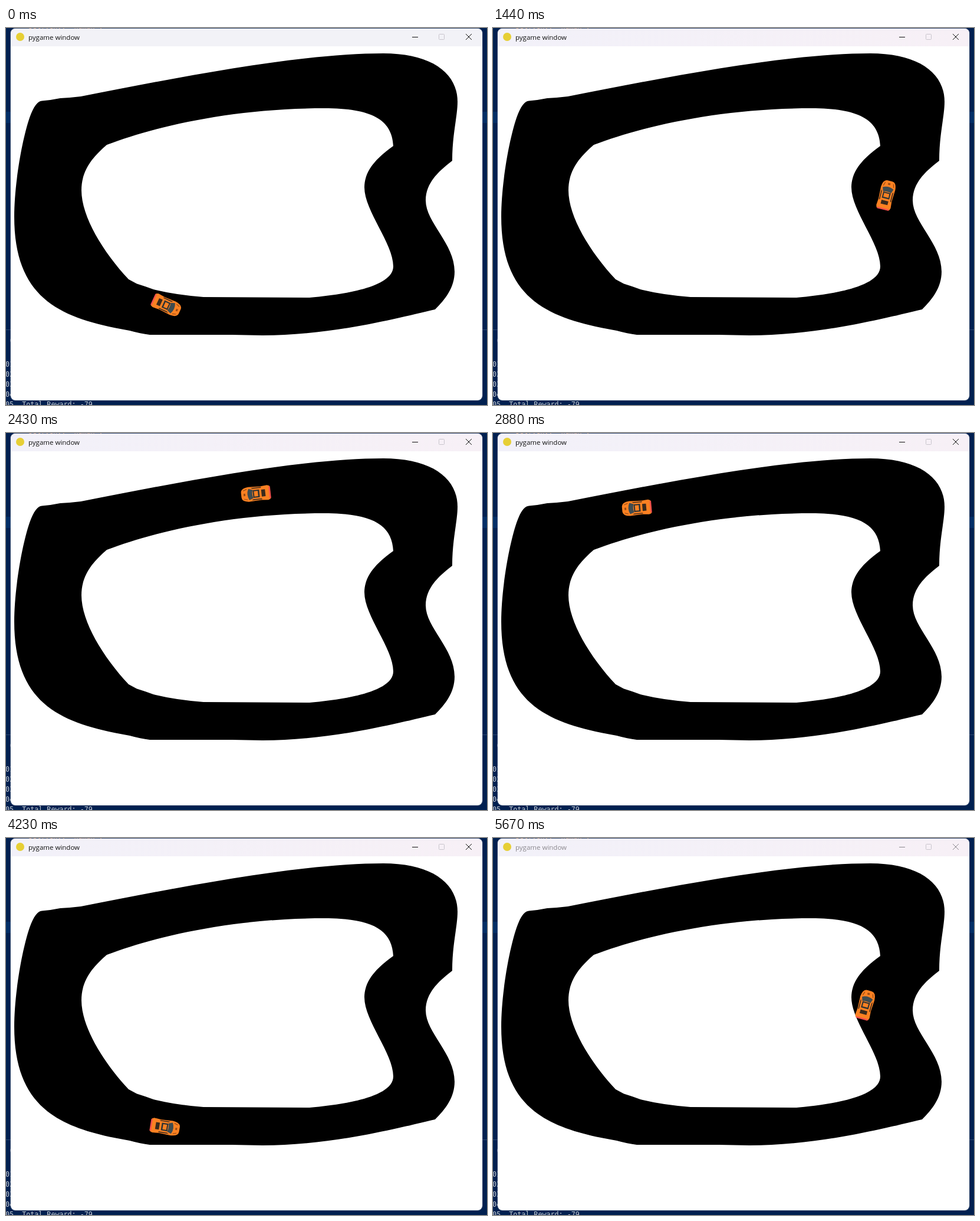
Write an HTML page that moves like this. It is 816x639 px and loops after 5750 ms.

```html
<!DOCTYPE html>
<html lang="en">
<head>
<meta charset="utf-8">
<title>pygame window</title>
<style>
  html, body { margin: 0; width: 100%; height: 100%; overflow: hidden; background: #012050; }
  svg { display: block; width: 816px; height: 639px; }
  .term { font: 11.7px "DejaVu Sans Mono", monospace; fill: #c8ccd4; white-space: pre; }
  .title { font: 11.5px "Open Sans", "Noto Sans", sans-serif; }
</style>
</head>
<body>
<svg viewBox="0 0 816 639">
  <defs>
    <linearGradient id="bar">
      <stop offset="0" stop-color="#f2f1f9"/>
      <stop offset="1" stop-color="#f7f0f6"/>
    </linearGradient>
    <clipPath id="frame"><rect x="8" y="1" width="800" height="630" rx="8"/></clipPath>
  </defs>

  <!-- terminal behind the window -->
  <rect width="816" height="639" fill="#012050"/>
  <rect y="142" width="816" height="19" fill="#022e66"/>
  <rect y="511" width="816" height="1" fill="#2c466f"/>
  <g class="term">
    <text x="38" y="1" fill="#d08a5a">self.env, "human":</text>
    <text x="5" y="534">(</text>
    <text x="-1" y="574">01</text>
    <text x="-1" y="591">02</text>
    <text x="-1" y="608">03</text>
    <text x="-1" y="625">04</text>
    <text x="-1" y="642">05, Total Reward: -79</text>
  </g>

  <!-- window -->
  <rect x="7.5" y="0.5" width="801" height="631" rx="8.5" fill="none" stroke="#8890a0" stroke-opacity=".4"/>
  <g clip-path="url(#frame)">
    <rect x="8" y="1" width="800" height="630" fill="#fff"/>
    <rect id="titlebar" x="8" y="1" width="800" height="30" fill="url(#bar)"/>
    <circle cx="24" cy="15" r="7" fill="#e6cf35"/>
    <g id="controls" fill="none" stroke="#111">
      <text class="title" id="caption" x="38" y="20" fill="#111" stroke="none">pygame window</text>
      <path d="M689 15.5H699M780 10L790 20M790 10L780 20"/>
    </g>
    <rect x="734.5" y="10.5" width="9" height="9" rx="1" fill="none" stroke="#c8c4cc"/>

    <path fill-rule="evenodd" d="
      M127 116C300 82 500 43 640 43C720 43 766 75 766 125C766 150 757 180 757 225
      C735 242 712 262 712 292C712 330 761 365 761 413C761 440 745 460 728 477
      C660 493 550 521 435 521L384 520H244Q228 518 210 513
      C96 493 14 462 14 320C14 265 27 190 40 152C47 132 54 124 61 123.5L75 122L92 119L108 118Z
      M171 198C250 168 380 136 540 136C620 136 655 155 657 200
      C635 216 608 238 608 270C608 310 657 365 657 404C657 440 570 452 515 457
      L335 456Q285 452 250 443L236 438L222 433.5L208 426
      C165 380 128 320 128 275C128 240 148 218 171 198Z"/>

    <!-- car, nose towards +x -->
    <g id="car">
      <path fill="#fb8122" d="M-24 -11L-20 -12.5L-8 -11.5L12 -12.5Q25 -11.5 25 -4V4Q25 11.5 12 12.5L-8 11.5L-20 12.5L-24 11Z"/>
      <path fill="#f4504c" d="M-25 -10H-22.5V10H-25Z"/>
      <path fill="#3a2a1c" d="M-16 -6H-9.5V6H-16ZM-10 -10.5H8L5 -9H-9ZM-10 10.5H8L5 9H-9Z"/>
      <path fill="#2c3335" d="M-6 -6.5H5V6.5H-6Z"/>
      <path fill="#fb8122" d="M-3.5 -4.5H3V4.5H-3.5Z"/>
      <path fill="#3f4c50" d="M5 -7L12 -9.5Q17 0 12 9.5L5 7Q7.5 0 5 -7Z"/>
      <path fill="none" stroke="#8a4312" d="M15 -9L21 -7M15 9L21 7"/>
      <path fill="#9a4a12" d="M18 -2H21V2H18Z"/>
    </g>
  </g>
</svg>
<script>
  const STEP = 90, LOOP = 5750;
  const $ = id => document.getElementById(id);

  // [first step, number of steps, route driven at constant speed]
  const legs = [
    [0, 10, "M272 470C363 512 530 500 624 466"],
    [10, 12, "M624 466C652 456 682 437 684 405S660 332 664 300S690 228 686 190S637 122 604 111"],
    [22, 10, "M604 111C504 77 344 118 244 127"],
    [32, 8, "M244 127C114 138 60 227 97 330"],
    [40, 15, "M97 330C110 366 146 436 175 456S260 492 300 493S480 476 555 471"],
    [55, 8, "M555 471C595 468 676 440 676 405S626 300 632 283"]
  ].map(([start, count, d]) => {
    const path = document.createElementNS("http://www.w3.org/2000/svg", "path");
    path.setAttribute("d", d);
    return { start, count, path, length: path.getTotalLength() };
  });

  function pose(step) {
    const leg = legs.findLast(l => l.start <= step);
    const s = leg.length * Math.min(1, (step - leg.start) / leg.count);
    const at = v => leg.path.getPointAtLength(Math.max(0, Math.min(leg.length, v)));
    const p = at(s), a = at(s - 1), b = at(s + 1);
    return { x: p.x, y: p.y, angle: Math.atan2(b.y - a.y, b.x - a.x) * 180 / Math.PI };
  }

  function draw(time) {
    const step = Math.floor(time % LOOP / STEP);
    const { x, y, angle } = pose(step);
    $("car").setAttribute("transform", `translate(${x} ${y}) rotate(${angle})`);

    // the window loses focus on the last step
    const ink = step === 63 ? "#8b888e" : "#111";
    $("controls").setAttribute("stroke", ink);
    $("caption").setAttribute("fill", ink);
    $("titlebar").setAttribute("fill", step ? "url(#bar)" : "#f2f2f7");
  }

  const begin = performance.now();
  (function tick() {
    draw(performance.now() - begin);
    requestAnimationFrame(tick);
  })();
</script>
</body>
</html>
```
